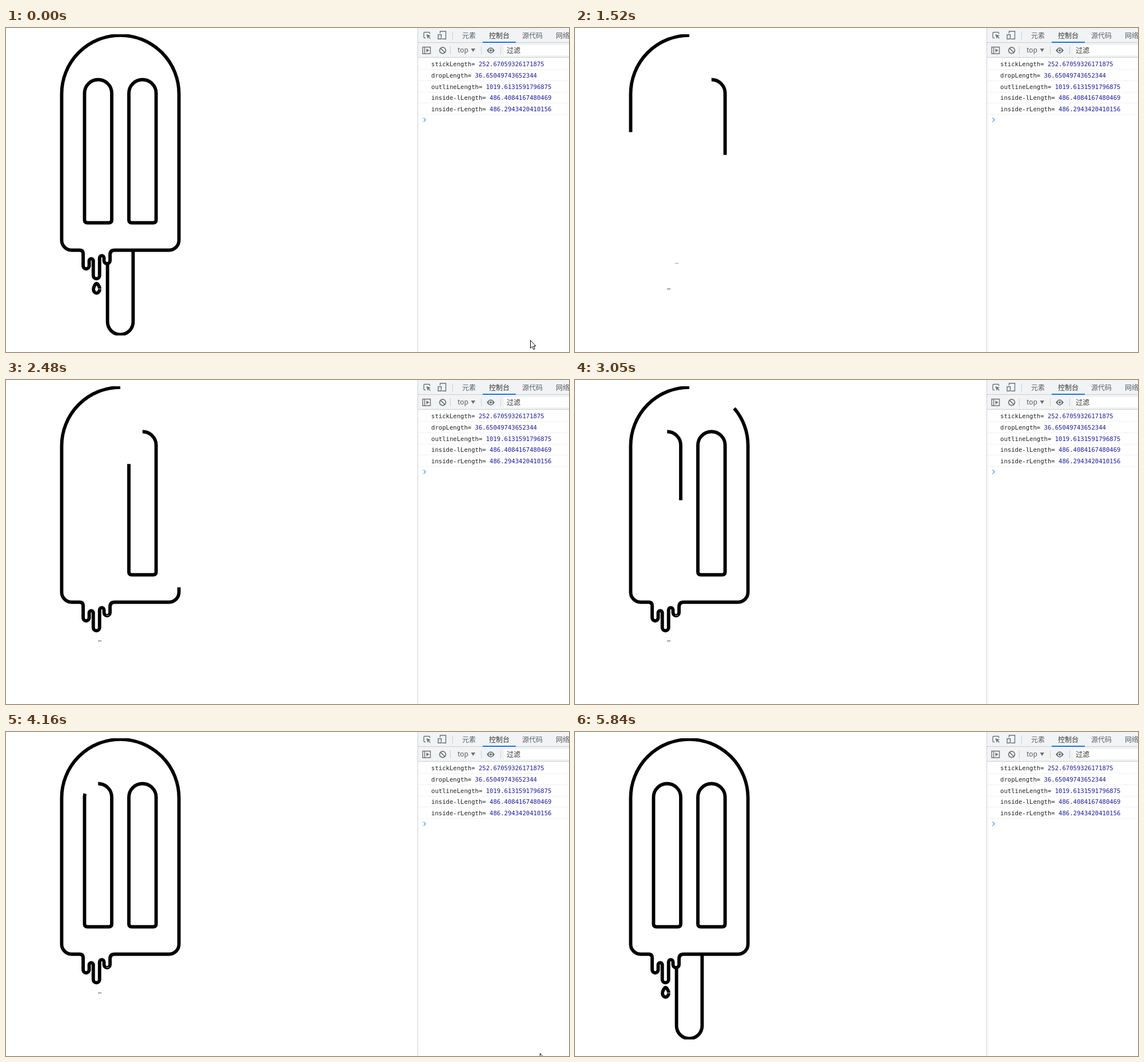
An HTML page that plays this animation: 985 px wide and 568 px high, repeating every 6440 ms.

```html
<!DOCTYPE html>
<html lang="zh">
<head>
<meta charset="utf-8">
<title>Popsicle</title>
<style>
html, body { margin: 0; width: 100%; height: 100%; overflow: hidden; background: #fff; }
svg { display: block; }
.ui { font: 12px "Noto Sans CJK SC", "Noto Sans", sans-serif; fill: #5f6368; }
.ui .dark { fill: #333; }
.log { font: 10.6px "DejaVu Sans Mono", monospace; fill: #202124; white-space: pre; }
.log tspan { fill: #1a1aa6; }
.icon { fill: none; stroke: #6e7379; stroke-width: 1.4; }
#ice { fill: none; stroke: #000; stroke-width: 5.88; }
</style>
</head>
<body>
<svg id="stage" width="985" height="568" viewBox="0 0 985 568">
  <svg id="ice" y="11" width="720" height="528" viewBox="0 11 720 528"></svg>
  <path id="stickDot" d="M175 412.5h6" stroke="#999"/>
  <path id="dropDot" d="M161 457.5h6" stroke="#444"/>

  <rect x="720" width="265" height="568" fill="#fff"/>
  <rect x="720" width="265" height="52" fill="#f1f3f4"/>
  <path d="M720.5 0V568M720 25.5H985M720 51.5H985M781.5 6V20M777.5 32V46M831.5 32V46M865.5 32V46" stroke="#cacdd1"/>
  <rect x="872" y="30" width="113" height="18" fill="#fff"/>
  <path d="M834 25H892" stroke="#1a73e8" stroke-width="2"/>
  <g class="icon">
    <path d="M734 17.5H732.5Q731 17.5 731 16V9Q731 7.5 732.5 7.5H740Q741.5 7.5 741.5 9V10.5"/>
    <path d="M735.5 11L743 13.6L740 15L743 18L742 19L739 16L737.8 19Z" fill="#6e7379" stroke="none"/>
    <path d="M759.5 9.5V5.7H769.5V19.3H763M756 11.7H761.5V19.3H756Z"/>
    <path d="M729 33.5H742.5V45H729ZM732.5 33.5V45"/>
    <path d="M735.5 36L740.5 39.3L735.5 42.5Z" fill="#6e7379" stroke="none"/>
    <circle cx="764" cy="39.3" r="5.4" stroke-width="1.7"/>
    <path d="M760.3 35.6L767.7 43" stroke-width="1.7"/>
    <path d="M813.5 36H821L817.2 42Z" fill="#6e7379" stroke="none"/>
    <path d="M841 39.3Q848 29 855 39.3Q848 49.6 841 39.3Z" fill="#6e7379" stroke="none"/>
    <circle cx="848" cy="39.3" r="2.7" stroke="#f1f3f4" fill="#6e7379"/>
  </g>
  <g class="ui">
    <text x="798" y="17.5">元素</text>
    <text x="845" y="17.5" class="dark">控制台</text>
    <text x="903" y="17.5">源代码</text>
    <text x="962" y="17.5">网络</text>
    <text x="790" y="43">top</text>
    <text x="876" y="44" class="dark">过滤</text>
  </g>
  <g id="logs"></g>
  <path id="prompt" d="M730.5 157.5L734 161L730.5 164.5" fill="none" stroke="#42a5f5" stroke-width="1.4"/>
  <path id="cursor" d="M.5 .5V14.2L3.7 11.4L6 16.6L8.2 15.6L6 10.6H10Z" fill="#fff" stroke="#000"/>
</svg>
<script>
const $ = id => document.getElementById(id);
const LOOP = 6440, STEP = 66.8, DONE = 9000;

function add(parent, tag, attrs) {
  const el = document.createElementNS("http://www.w3.org/2000/svg", tag);
  for (const key in attrs) el.setAttribute(key, attrs[key]);
  return parent.appendChild(el);
}

const bar = (left, right) =>
  `M${(left + right) / 2} 90.5A23.8 23.8 0 0 1 ${right} 114.3V336.5Q${right} 341.5 ${right - 5} 341.5` +
  `H${left + 5}Q${left} 341.5 ${left} 336.5V114.3A23.8 23.8 0 0 1 ${(left + right) / 2} 90.5`;

const outline = "M200 12.9A102.6 102.6 0 0 0 97.4 115.5V372A17.5 17.5 0 0 0 115 389.5H129" +
  "Q135 389.5 135 396V417A5.25 5.25 0 0 0 145.5 417V408A3.6 3.6 0 0 1 152.7 408V434" +
  "A5.5 5.5 0 0 0 163.7 434V403A3.9 3.9 0 0 1 171.5 403V408A5.25 5.25 0 0 0 182 408V398" +
  "Q182 389.5 190 389.5H285A17.5 17.5 0 0 0 302.6 372V115.5A102.6 102.6 0 0 0 200 12.9";
const stick = "M222.4 391V515A22.4 22.4 0 0 1 177.6 515V412";
const drop = "M163.9 457.8C163.9 462 161 464.7 158.4 464.7S153 462 153 458" +
  "C153 454 156.5 448 158.4 448S163.9 453.5 163.9 457.1";

// path, delay, duration
const lines = [
  [stick, 3000, 1000], [drop, 4000, 500], [outline, 0, 2000],
  [bar(137.4, 185), 1500, 1500], [bar(215, 262.6), 0, 1500],
].map(([d, delay, span]) => ({ delay, span, el: add($("ice"), "path", { d, pathLength: 1 }) }));

[["stick", "252.67059326171875"], ["drop", "36.65049743652344"], ["outline", "1019.6131591796875"],
 ["inside-l", "486.4084167480469"], ["inside-r", "486.2943420410156"]].forEach(([name, value], i) => {
  const y = Math.round(67.4 + i * 19.6);
  const text = add($("logs"), "text", { x: 744, y, class: "log" });
  text.append(name + "Length= ");
  add(text, "tspan", {}).append(value);
  add($("logs"), "path", { d: `M721 ${y + 5.5}H985`, stroke: "#f0f0f0" });
});

// first time, last time, steps, drawing clock at the first step
const runs = [
  [0, 0, 1, DONE], [70, 320, 5, DONE], [1120, 1120, 1, DONE],
  [1250, 1730, 8, 114], [1800, 2410, 10, 648], [2480, 3120, 10, 1316],
  [3190, 3820, 10, 1984], [3880, 4510, 10, 2652], [4580, 4580, 1, 3406],
  [4730, 5360, 10, 3476], [5410, 5840, 7, 4144],
];

function sample(t) {
  const [from, to, count, clock] = runs.findLast(run => run[0] <= t);
  const gap = (to - from) / (count - 1) || 1;
  const k = Math.min(count - 1, Math.floor((t - from) / gap + .1));
  return { time: from + k * gap, clock: clock + k * STEP };
}

const smooth = p => p * p * (3 - 2 * p);
const easeOut = p => 1 - (1 - p) ** 2;
// start, end, from x, y, to x, y, easing
const moves = [
  [0, 260, 917, 547, 90, 17, smooth],
  [3400, 3679, 150, 12, 840, 502, easeOut],
  [3679, 3825, 840, 502, 850, 512, p => p],
  [3825, 4240, 850, 512, 943, 568, smooth],
];

function draw(t) {
  const { time, clock } = sample(t);
  for (const { el, delay, span } of lines) {
    const p = Math.max(0, Math.min(1, (clock - delay) / span));
    el.style.strokeDasharray = p < 1 ? `${p} 2` : "none";
  }
  $("stickDot").style.display = clock < 3000 ? "" : "none";
  $("dropDot").style.display = clock < 4500 ? "" : "none";

  const cleared = time >= 1120 && time < 1250;
  $("logs").style.display = cleared ? "none" : "";
  $("prompt").setAttribute("transform", `translate(0 ${cleared ? -99 : 0})`);
  $("prompt").style.opacity = cleared ? .2 : 1;

  const move = moves.find(m => time >= m[0] && time < m[1]);
  $("cursor").style.display = move ? "" : "none";
  if (move) {
    const [a, b, x0, y0, x1, y1, ease] = move;
    const p = ease((time - a) / (b - a));
    $("cursor").setAttribute("transform",
      `translate(${Math.round(x0 + (x1 - x0) * p)} ${Math.round(y0 + (y1 - y0) * p)})`);
  }
}

const begin = performance.now();
function tick() {
  draw((performance.now() - begin) % LOOP);
  requestAnimationFrame(tick);
}
tick();
</script>
</body>
</html>
```
